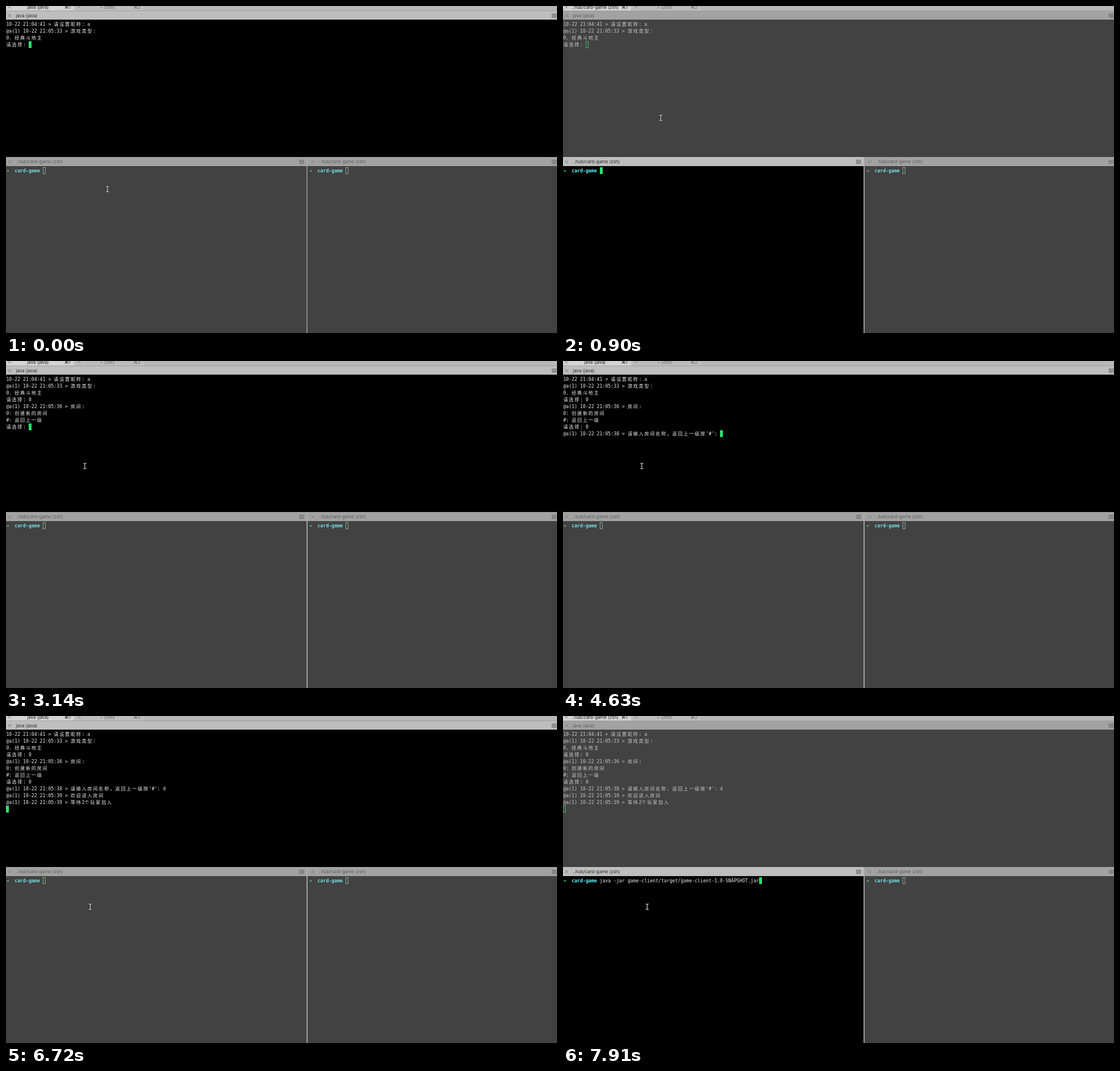
These frames come from a looping animation (972x576 px, 8 s). An HTML page with a canvas:

```html
<!DOCTYPE html>
<html lang="zh-CN">
<head>
<meta charset="utf-8">
<title>Terminal card game</title>
<style>
  html, body { margin: 0; width: 100%; height: 100%; overflow: hidden; background: #000; }
  canvas { display: block; width: 972px; height: 576px; }
</style>
</head>
<body>
<canvas id="stage" width="972" height="576"></canvas>
<script>
const ctx = document.getElementById('stage').getContext('2d');
const LOOP = 8000;
const CELL = 4.935, ROW = 12;
const MONO = '8.2px "DejaVu Sans Mono", "Noto Sans CJK SC", "Noto Sans CJK", monospace';
const CJK = '8.2px "Noto Sans CJK SC", "Noto Sans CJK", sans-serif';
const UI = '7.8px Inter, "DejaVu Sans", sans-serif';
const SHELL = '..hub/card-game (zsh)';
const COMMAND = 'java -jar game-client/target/game-client-1.0-SNAPSHOT.jar';

// Terminal output: [time, text appended]
const output = [
  [0, '10-22 21:04:41 > 请设置昵称: a\n@a(1) 10-22 21:05:33 > 游戏类型:\n0. 经典斗地主\n请选择: '],
  [2690, '0'],
  [3140, '\n@a(1) 10-22 21:05:36 > 房间:\n0: 创建新的房间\n#: 返回上一级\n请选择: '],
  [4480, '0'],
  [4630, "\n@a(1) 10-22 21:05:38 > 请输入房间名称, 返回上一级按'#': "],
  [5970, 'd'],
  [6120, '\n@a(1) 10-22 21:05:39 > 欢迎进入房间\n@a(1) 10-22 21:05:39 > 等待2个玩家加入\n']
];
const focusChanges = [[0, 'top'], [150, 'left'], [1190, 'top'], [7010, 'left']];
// Pointer: [time, x, y]
const pointer = [
  [0, 179, 322.5], [750, 172, 286], [900, 172.5, 197], [1790, 154.5, 193],
  [1940, 139, 185], [6420, 136.5, 253], [6570, 137.5, 268], [6720, 148.5, 336]
];

const latest = (steps, t) => steps.filter(s => s[0] <= t).pop();

function rect(x, y, w, h, color) {
  ctx.fillStyle = color;
  ctx.fillRect(x, y, w, h);
}

function lines(color, width, ...segments) {
  ctx.strokeStyle = color;
  ctx.lineWidth = width;
  ctx.beginPath();
  for (const [x1, y1, x2, y2] of segments) {
    ctx.moveTo(x1, y1);
    ctx.lineTo(x2, y2);
  }
  ctx.stroke();
}

function label(text, x, y, color, align = 'left') {
  ctx.font = UI;
  ctx.fillStyle = color;
  ctx.textAlign = align;
  ctx.fillText(text, x, y);
}

function closeIcon(x, y, color) {
  const r = 2.8;
  lines(color, 0.8, [x - r, y - r, x + r, y + r], [x - r, y + r, x + r, y - r]);
}

// Writes text on the character grid and returns the x after it.
function gridText(text, x, middle, color, bold = false) {
  ctx.fillStyle = color;
  ctx.textAlign = 'left';
  for (const ch of text) {
    const wide = ch >= '\u3000';
    ctx.font = wide ? CJK : (bold ? 'bold ' : '') + MONO;
    ctx.fillText(ch, x, middle + 3);
    x += wide ? CELL * 2 : CELL;
  }
  return x;
}

function caret(x, middle, active, dimColor) {
  x = Math.round(x);
  if (active) {
    rect(x, middle - 6, 5, ROW, '#2be070');
  } else {
    ctx.strokeStyle = dimColor;
    ctx.lineWidth = 0.9;
    ctx.strokeRect(x + 0.5, middle - 5.5, 4, ROW - 1);
  }
}

function titleBar(x, y, w, h, title, active) {
  const middle = y + h / 2 + 0.5;
  const right = Math.min(x + w, 976) - 4.5;
  rect(x, y, w, h, active ? '#bebebe' : '#a2a2a2');
  closeIcon(x + 6.5, middle, active ? '#666' : '#707070');
  label(title, x + 17.5, middle + 2.8, active ? '#2c2c2c' : '#5e5e5e');
  lines(active ? '#555' : '#666', 0.9,
    ...[-3, -1, 1, 3].map(d => [right - 9, middle + d, right, middle + d]));
}

function paneBody(x, y, w, h, active) {
  rect(x, y, w, h, active ? '#000' : '#424242');
}

function tabs(focus) {
  rect(0, 0, 972, 9, '#b7b7b7');
  rect(0, 0, 120, 8, '#d3d3d3');
  rect(120, 0, 123, 8, '#bdbdbd');
  rect(0, 8, 972, 1, '#a0a0a0');
  closeIcon(6, 1.5, '#666');
  closeIcon(129.5, 1.5, '#777');
  label(focus === 'top' ? 'java (java)' : SHELL, 56.5, 4.7, '#222', 'center');
  label('⌘1', 108.5, 4.7, '#222', 'center');
  label('~ (zsh)', 179, 4.7, '#666', 'center');
  label('⌘2', 231, 4.7, '#666', 'center');
}

function topPane(t, active) {
  titleBar(0, 9, 976, 15, 'java (java)', active);
  paneBody(0, 24, 972, 242, active);
  const text = output.filter(s => s[0] <= t).map(s => s[1]).join('');
  let x = 0, middle = 32;
  text.split('\n').forEach((line, i) => {
    middle = 32 + i * ROW;
    x = gridText(line, 0.4, middle, active ? '#ececec' : '#c6c6c6');
  });
  caret(x, middle, active, '#48bd7b');
}

function shellPane(x, w, command, active) {
  titleBar(x, 266, w, 16, SHELL, active);
  paneBody(x, 282, w, 294, active);
  const middle = 290;
  gridText('➜', x + 0.4, middle, active ? '#55f477' : '#6bd883', true);
  let end = gridText('card-game', x + 0.4 + 3 * CELL, middle, active ? '#5ffbff' : '#72dfe2', true);
  end = gridText(command, end + CELL, middle, '#ececec');
  caret(end, middle, active, '#8bb79b');
}

function iBeam(x, y) {
  const shape = [
    [x, y - 4.5, x, y + 4.5],
    [x - 2.5, y - 5, x - 0.4, y - 4.4], [x + 2.5, y - 5, x + 0.4, y - 4.4],
    [x - 2.5, y + 5, x - 0.4, y + 4.4], [x + 2.5, y + 5, x + 0.4, y + 4.4]
  ];
  lines('rgba(0,0,0,.5)', 2.2, ...shape);
  lines('#e4e4e4', 1.1, ...shape);
}

function draw(t) {
  const focus = latest(focusChanges, t)[1];
  tabs(focus);
  topPane(t, focus === 'top');
  shellPane(0, 530.5, t >= 7910 ? COMMAND : '', focus === 'left');
  shellPane(534.4, 441.6, '', false);
  rect(531, 266, 3.4, 16, '#a2a2a2');
  rect(532, 282, 2.4, 294, '#424242');
  rect(530.5, 266, 1, 310, '#b4b4b4');
  const [, x, y] = latest(pointer, t);
  iBeam(x, y);
}

const start = performance.now();
function tick() {
  draw((performance.now() - start) % LOOP);
  requestAnimationFrame(tick);
}
tick();
</script>
</body>
</html>
```
